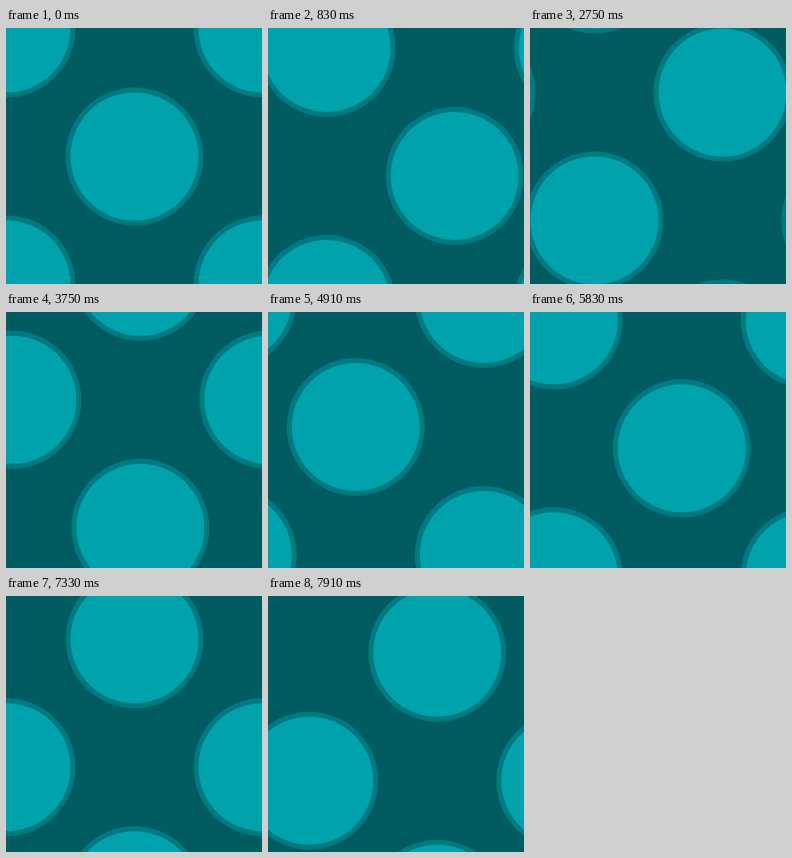
These frames come from a looping animation (256 by 256 pixels, 8000 ms). An HTML page:

```html
<!DOCTYPE html>
<html lang="en">
<head>
<meta charset="utf-8">
<title>Drifting dots</title>
<style>
  html, body { margin: 0; width: 100%; height: 100%; overflow: hidden; background: #005c60; }
  svg { display: block; width: 100%; height: 100%; }
</style>
</head>
<body>
<svg viewBox="0 0 256 256">
  <defs>
    <g id="dot">
      <circle r="69" fill="#007a80"/>
      <circle r="64" fill="#00a2ab"/>
    </g>
  </defs>
  <rect width="256" height="256" fill="#005c60"/>
  <g id="field"></g>
</svg>
<script>
  const TILE = 256, LOOP = 8000, FPS = 12, STEPS = 96;
  const CYCLE_X = 44, CYCLE_Y = 132; // steps needed to cross one tile
  const field = document.getElementById('field');

  function addDot(x, y) {
    const dot = document.createElementNS('http://www.w3.org/2000/svg', 'use');
    dot.setAttribute('href', '#dot');
    dot.setAttribute('x', x);
    dot.setAttribute('y', y);
    field.append(dot);
  }

  // Staggered lattice, large enough to cover any wrapped offset
  for (let row = -1; row <= 1; row++) {
    for (let col = -1; col <= 1; col++) {
      addDot(col * TILE, row * TILE);
      addDot((col + 0.5) * TILE, (row + 0.5) * TILE);
    }
  }

  function draw(ms) {
    // Steps begin on times rounded down to 10 ms
    const step = Math.min(STEPS - 1, Math.floor((ms % LOOP + 7) * FPS / 1000));
    const x = (0.5 + step * TILE / CYCLE_X) % TILE;
    const y = (0.5 + step * TILE / CYCLE_Y) % TILE;
    field.setAttribute('transform', `translate(${x.toFixed(2)} ${y.toFixed(2)})`);
  }

  const start = performance.now();
  function tick() {
    draw(performance.now() - start);
    requestAnimationFrame(tick);
  }
  tick();
</script>
</body>
</html>
```
